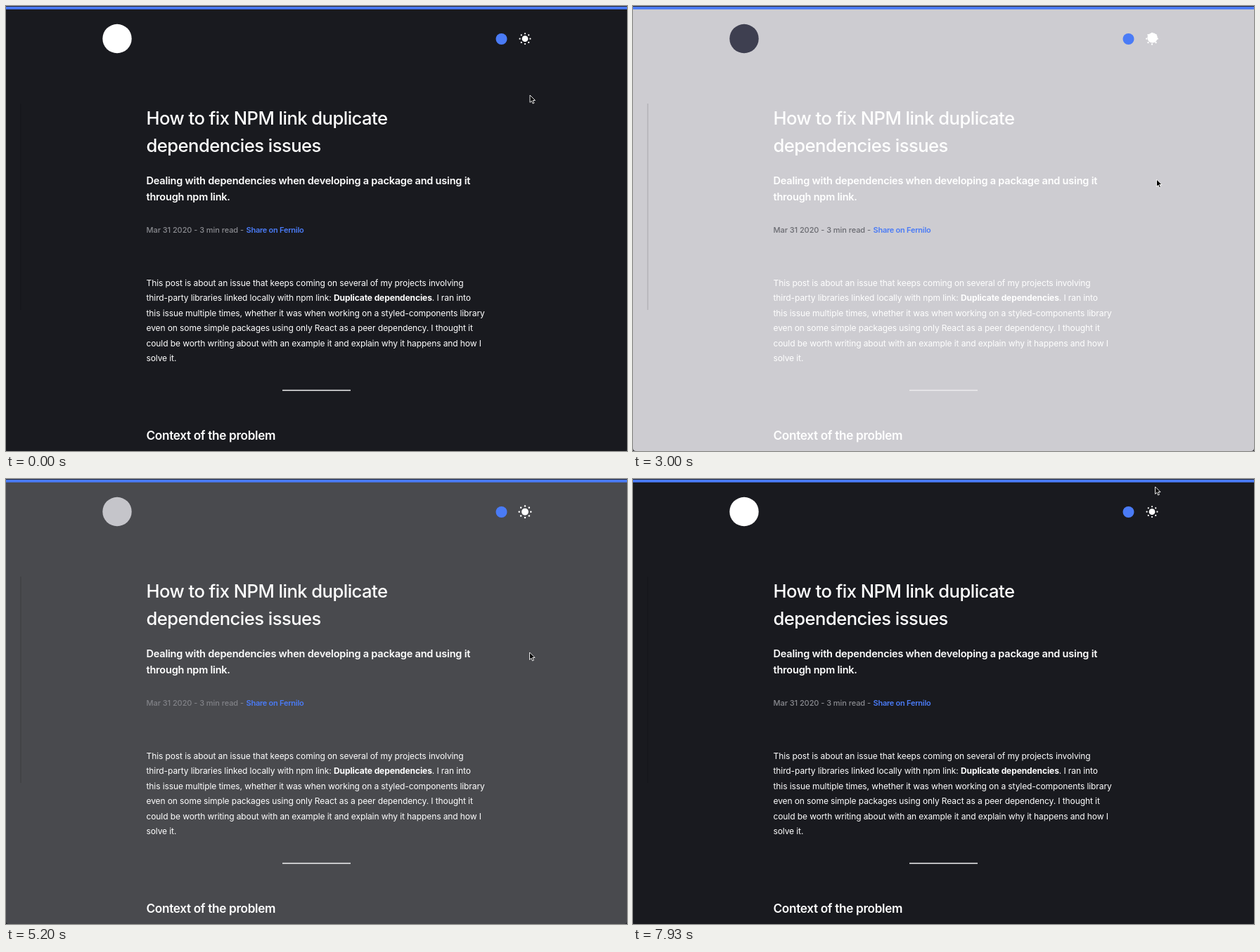
These frames come from a looping animation (883x634 px, 8 s). An HTML page:

```html
<!DOCTYPE html>
<html lang="en">
<head>
<meta charset="utf-8">
<title>Theme flash on reload</title>
<style>
  html, body { margin: 0; width: 100%; height: 100%; overflow: hidden; background: #222329; }
  svg { display: block; width: 883px; height: 634px; }
  text { font-family: Inter, "Open Sans", sans-serif; fill: #fff; white-space: pre; }
  .title { font-size: 25.6px; font-weight: 500; letter-spacing: -.021em; }
  .lead { font-size: 14.5px; font-weight: 600; letter-spacing: -.014em; }
  .meta { font-size: 11px; font-weight: 500; letter-spacing: -.006em; }
  .share { font-size: 11px; font-weight: 600; letter-spacing: -.023em; fill: #4a7bf6; }
  .body { font-size: 12px; letter-spacing: -.008em; }
  .body tspan { font-weight: 700; }
  .head { font-size: 17.2px; font-weight: 600; letter-spacing: -.019em; }
</style>
</head>
<body>
<svg viewBox="0 0 883 634">
  <rect id="bg" y="-10" width="883" height="644" rx="4"/>
  <g id="page">
    <rect y="1" width="883" height="3.8" fill="#4a7bf6"/>
    <rect x="20.5" y="139" width="1" height="294" fill="#000" opacity=".18"/>
    <circle id="logo" cx="158" cy="46.5" r="20.7"/>
    <circle cx="704.5" cy="47" r="8" fill="#4a7bf6"/>
    <g transform="translate(738 46.7)">
      <g id="moon">
        <path d="M0-7.4A7.4 7.4 0 1 0 7.3-.2A5.4 5.4 0 0 1 0-7.4" fill="#1f222b"/>
        <g fill="#f5f4f8">
          <circle cx="-3" cy="-1.5" r=".7"/>
          <circle cx="-1" cy="2.5" r=".7"/>
          <circle cx="1" cy="-.8" r=".6"/>
        </g>
      </g>
      <g id="sun" fill="#fff"><circle r="4.4"/></g>
      <circle id="blob" cx=".6" cy="-1.3" fill="#fff"/>
    </g>
    <g id="copy"></g>
    <rect id="rule" x="393" y="546.8" width="97" height="1.5"/>
  </g>
  <rect width="883" height="1" fill="#2b2b33"/>
  <path id="cursor" d="M0 0V10.4L2.4 8.2L4.1 12L5.9 11.2L4.2 7.5H7.5Z"
    fill="#000" stroke="#fff" stroke-width=".9" stroke-linejoin="round"/>
</svg>
<script>
const LOOP = 8000, STEP = 1000 / 15, SLACK = 4, FADE = 500;
const LIGHT = [245, 244, 248], DARK = [25, 26, 31];
// Each reload: blank screen, page painted, theme fade begins
const RELOADS = [[2330, 2670, 2930], [4470, 5000, 4964], [6600, 7130, 7160]];

const $ = id => document.getElementById(id);
const clamp = v => Math.min(1, Math.max(0, v));
const mix = (a, b, p) => `rgb(${a.map((v, i) => Math.round(v + (b[i] - v) * p))})`;
const show = (id, on) => $(id).setAttribute('visibility', on ? 'inherit' : 'hidden');
const set = (id, name, value) => $(id).setAttribute(name, value);

// The CSS "ease" curve, solved by bisection
function ease(x) {
  let lo = 0, hi = 1, s = .5;
  for (let i = 0; i < 24; i++) {
    s = (lo + hi) / 2;
    if (.75 * s * (1 - s) + s ** 3 < x) lo = s; else hi = s;
  }
  return .3 * (1 - s) ** 2 * s + 3 * (1 - s) * s * s + s ** 3;
}

function lines(cls, y, gap, rows, x = 199.5) {
  $('copy').innerHTML += rows.map((row, i) =>
    `<text class="${cls}" x="${x}" y="${y + i * gap}">${row}</text>`).join('');
}

lines('title', 168.6, 39.5, ['How to fix NPM link duplicate', 'dependencies issues']);
lines('lead', 254, 23, ['Dealing with dependencies when developing a package and using it', 'through npm link.']);
lines('meta', 323, 0, ['Mar 31 2020 - 3 min read -']);
lines('share', 323, 0, ['Share on Fernilo'], 341.5);
lines('body', 399, 21.45, [
  'This post is about an issue that keeps coming on several of my projects involving',
  'third-party libraries linked locally with npm link: <tspan>Duplicate dependencies</tspan>. I ran into',
  'this issue multiple times, whether it was when working on a styled-components library',
  'even on some simple packages using only React as a peer dependency. I thought it',
  'could be worth writing about with an example it and explain why it happens and how I',
  'solve it.'
]);
lines('head', 618, 0, ['Context of the problem']);
const meta = document.querySelector('.meta');

for (let i = 0; i < 8; i++) {
  const a = i * Math.PI / 4;
  $('sun').innerHTML += `<circle cx="${7.4 * Math.cos(a)}" cy="${7.4 * Math.sin(a)}" r="1.1"/>`;
}

function cursorAt(t) {
  if (t < 60) return [745, 127];
  const k = clamp((t - 7640) / 280), p = k * k * (3 - 2 * k);
  return [744.5 - 2 * p, 247 - 236 * p];
}

function draw(t) {
  const last = RELOADS.filter(r => t >= r[0]).pop();
  const blank = !!last && t < last[1];
  const u = last ? clamp((t - last[2]) / FADE) : 1;
  const p = u < 1 ? ease(u) : 1, light = u < .02;

  set('bg', 'fill', blank ? '#fefdff' : mix(LIGHT, DARK, p));
  show('page', !blank);
  set('logo', 'fill', mix([36, 37, 56], [255, 255, 255], p ** 1.25));
  meta.style.fill = mix([98, 99, 105], [138, 139, 144], p);
  set('rule', 'fill', mix([228, 226, 229], [245, 245, 246], clamp(p * 3)));

  show('moon', light);
  show('sun', !light);
  set('sun', 'transform', `scale(${1 + .12 * Math.sin(Math.PI * u)})`);
  set('blob', 'r', light ? 0 : 7.5 * clamp(1 - (u / .4) ** 3));
  set('cursor', 'transform', `translate(${cursorAt(t)})`);
}

// The picture advances at 15 steps a second
const start = performance.now();
function tick() {
  const t = (performance.now() - start) % LOOP;
  draw(Math.floor((t + SLACK) / STEP) * STEP % LOOP + SLACK);
  requestAnimationFrame(tick);
}
tick();
</script>
</body>
</html>
```
